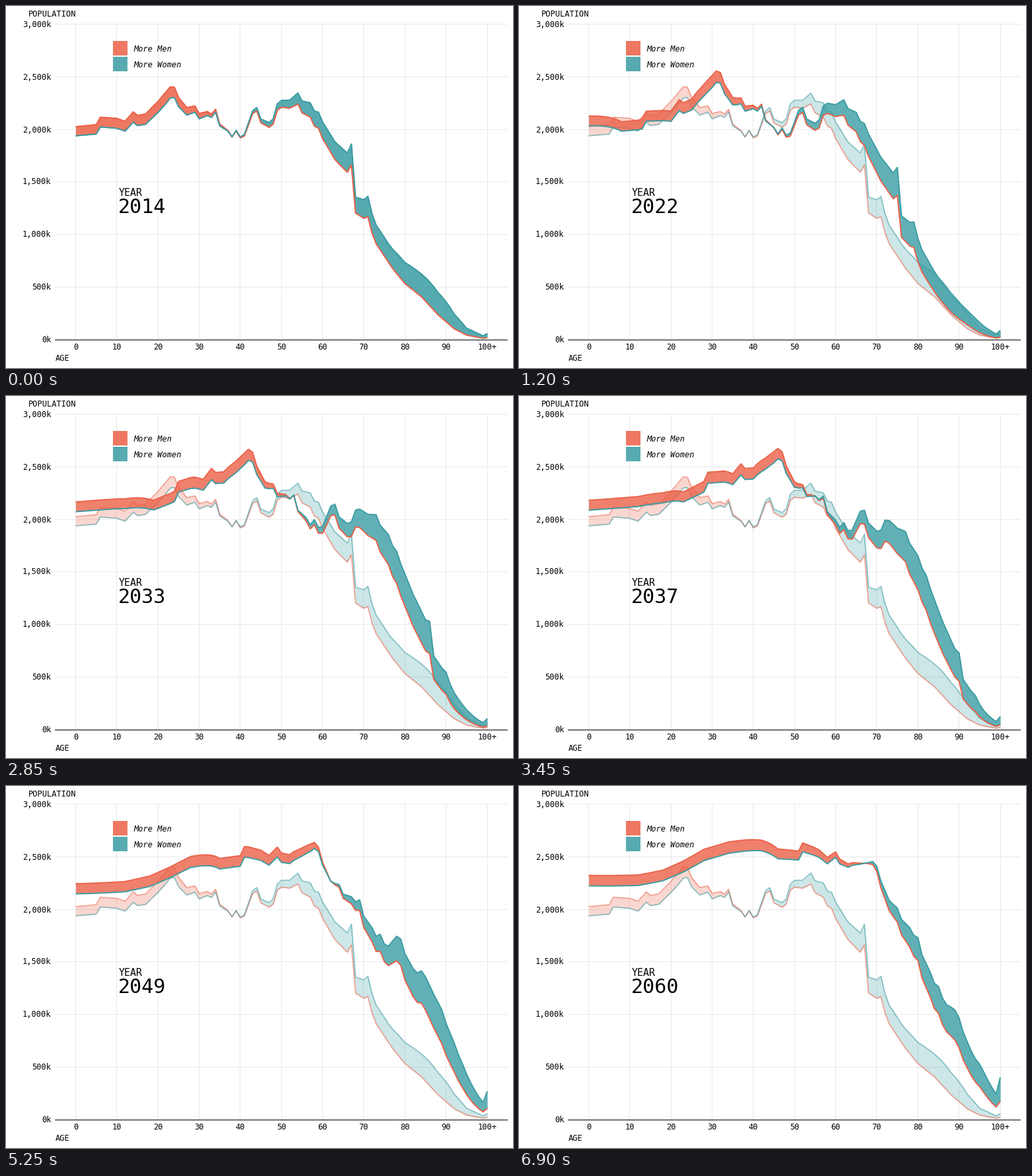
Animation of 768x549 px, one loop 7050 ms. Source, as a matplotlib script:

```python
import numpy as np
import matplotlib.pyplot as plt
from matplotlib.animation import FuncAnimation
from matplotlib.patches import Rectangle

W, H, DPI = 768, 549, 96
FIRST, LAST = 2014, 2060
RED, TEAL, GRID = "#eb6047", "#3a9ca3", "#e9e9e9"
AGES = np.arange(101)

# Turning points of the first year's men: age, thousands
MEN_POINTS = [
    (0, 2025), (5, 2044), (6, 2115), (10, 2104), (12, 2076), (14, 2166),
    (15, 2132), (17, 2146), (20, 2265), (23, 2404), (24, 2400), (25, 2303),
    (27, 2207), (29, 2222), (30, 2150), (32, 2169), (33, 2145), (34, 2190),
    (35, 2050), (37, 1988), (38, 1928), (39, 1985), (40, 1918), (41, 1937),
    (43, 2150), (44, 2175), (45, 2062), (47, 2019), (48, 2050), (49, 2182),
    (50, 2210), (52, 2201), (54, 2241), (55, 2157), (57, 2116), (58, 2031),
    (59, 2010), (60, 1912), (63, 1712), (66, 1592), (67, 1661), (68, 1204),
    (70, 1154), (71, 1169), (72, 1016), (73, 912), (77, 677), (80, 533),
    (84, 408), (88, 238), (92, 103), (95, 43), (99, 13)]

# Log ratio of women to men, and log gain by migration up to an age
SEX_GAP = [(0, -.044), (22, -.048), (38, 0), (52, .034), (60, .079),
           (68, .118), (76, .213), (84, .425), (92, .85), (99, 1)]
MIGRATION = [(0, 0), (12, .035), (18, .066), (23, .108), (28, .156),
             (34, .19), (42, .22), (55, .24), (80, .25)]


def along(points, x):
    return np.interp(x, *zip(*points))


class Group:
    """One sex: its first-year population, aged cohort by cohort."""

    def __init__(self, gap, death_scale, death_rate, oldest):
        self.base = along(MEN_POINTS, AGES) * np.exp(gap)
        self.death_scale, self.death_rate = death_scale, death_rate
        self.oldest = oldest

    def births(self, t):
        return self.base[0] * (1 + 0.054 * (1 - np.exp(-t / 4)) + 4.4e-5 * t**2)

    def hazard(self, age):
        return self.death_scale * np.exp(self.death_rate * age)

    def at(self, t):
        origin = AGES - t
        entry = np.maximum(origin, 0)
        start = np.where(origin > 0, self.base[entry],
                         self.births(np.maximum(-origin, 0)))
        gain = along(MIGRATION, AGES) - along(MIGRATION, entry)
        loss = self.hazard(AGES) - self.hazard(entry)
        people = start * np.exp(gain * (0.94 + 0.004 * t) - loss * (1 - 0.006 * t))
        people[100] = self.oldest * people[99]
        return people


men = Group(0, 2.05e-4, 0.1, 1.45)
women = Group(along(SEX_GAP, AGES), 7.15e-5, 0.108, 1.65)


def px(age):
    return 105.5 + 6.235 * age


def py(thousands):
    return 506 - 0.1595 * thousands


def pt(pixels):
    return pixels * 72 / DPI


fig = plt.figure(figsize=(W / DPI, H / DPI), dpi=DPI, facecolor="white")
ax = fig.add_axes([0, 0, 1, 1])
ax.set_xlim(0, W)
ax.set_ylim(H, 0)
ax.axis("off")


def label(x, y, text, size=12, **kw):
    return ax.text(x, y, text, fontsize=pt(size), family="DejaVu Sans Mono",
                   va="baseline", color="black", zorder=9, **kw)


def rule(xs, ys, color, z):
    ax.plot(xs, ys, color=color, lw=pt(1), zorder=z, snap=False,
            solid_capstyle="butt")


def band(t, fill_alpha, line_alpha, width, z):
    x, m, w = px(AGES), py(men.at(t)), py(women.at(t))
    parts = []
    for where, color in ((m <= w, RED), (m >= w, TEAL)):
        parts.append(ax.fill_between(x, m, w, where=where, interpolate=True,
                                     color=color, alpha=fill_alpha, lw=0, zorder=z))
    for ys, color in ((m, RED), (w, TEAL)):
        parts += ax.plot(x, ys, color=color, alpha=line_alpha, lw=pt(width),
                         zorder=z + 1, solid_capstyle="butt")
    return parts


for k in range(0, 3001, 500):
    y = np.floor(py(k)) + 0.5
    if k:
        rule([74, 760], [y, y], GRID, 1)
    label(68.5, y + 4, f"{k:,}k", ha="right")
for age in range(0, 101, 10):
    x = np.floor(px(age)) + 0.5
    rule([x, x], [27, 506], GRID, 1)
    label(x, 521, "100+" if age == 100 else str(age), ha="center")
rule([74, 760], [506.5, 506.5], "black", 8)

label(34, 16, "POPULATION")
label(75, 538, "AGE")
label(171, 288, "YEAR", 15)
year_text = label(170, 314, str(FIRST), 30)

for top, color, text in ((53, RED, "More Men"), (77, TEAL, "More Women")):
    ax.add_patch(Rectangle((162, top), 22, 22, color=color, alpha=0.85, lw=0, zorder=7))
    label(193, top + 16, text, style="italic")

band(0, 0.25, 0.58, 1.7, 2)
current = []


def draw(i):
    while current:
        current.pop().remove()
    current.extend(band(i, 0.8, 1, 1.9, 4))
    year_text.set_text(str(FIRST + i))
    return current


anim = FuncAnimation(fig, draw, frames=LAST - FIRST + 1, interval=150,
                     repeat=True, repeat_delay=0, blit=False)
plt.show()
```
